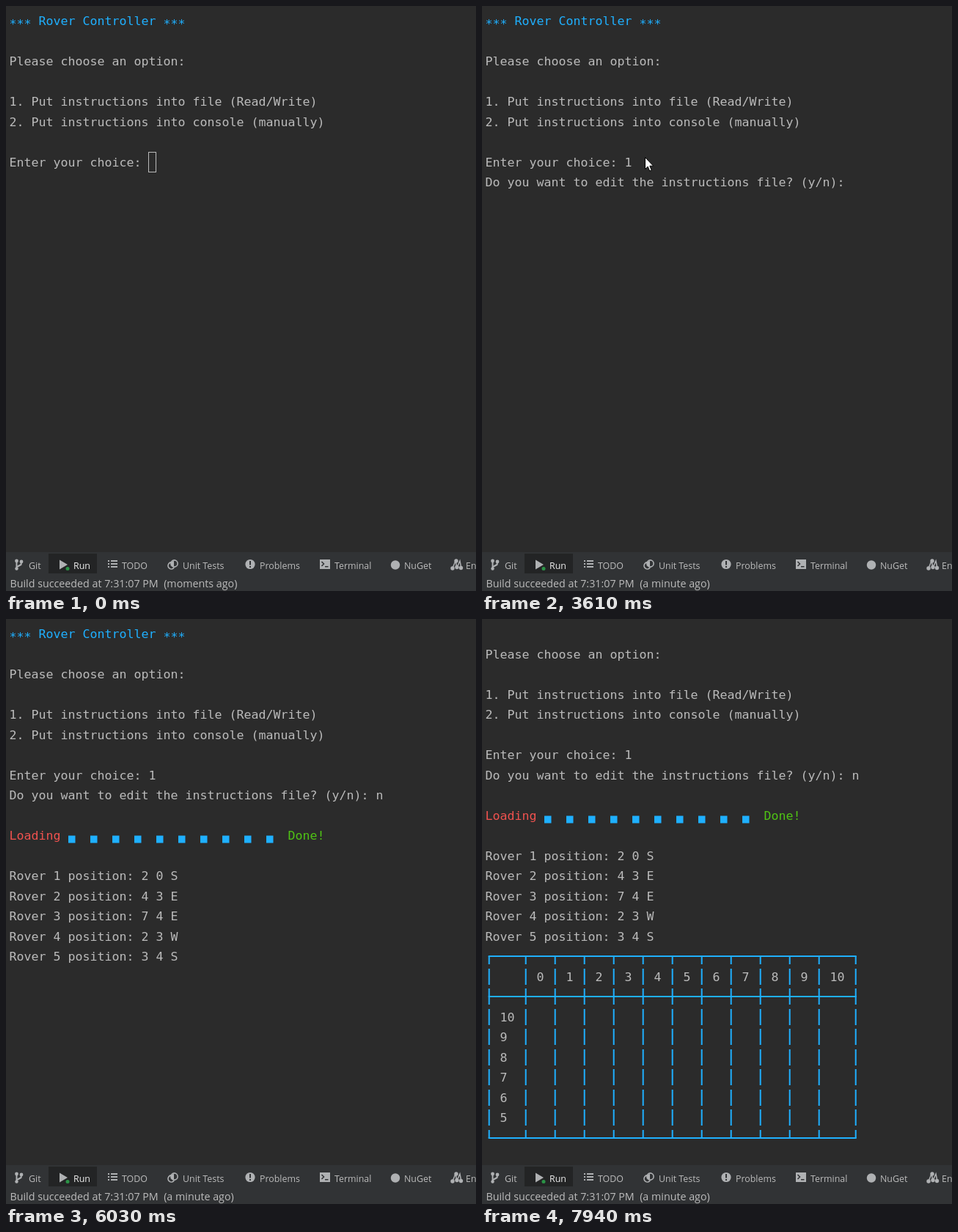
An HTML page with a canvas for the animation above (8 s loop, 641 by 798 pixels).

```html
<!DOCTYPE html>
<html lang="en">
<head>
<meta charset="utf-8">
<title>Rover Controller</title>
<style>
  html, body { margin: 0; width: 100%; height: 100%; overflow: hidden; background: #2b2b2b; }
  canvas { display: block; }
</style>
</head>
<body>
<canvas id="stage" width="641" height="798"></canvas>
<script>
const ctx = document.getElementById('stage').getContext('2d');
const LOOP = 8000;
const MONO = '16.61px "DejaVu Sans Mono", monospace';
const UI = '"Open Sans", sans-serif';
const GREY = '#bbbbbb', BLUE = '#1fb0ff', RED = '#f0524f', GREEN = '#4fc414';
const ICON = '#afb1b3', BAR = '#313335';

const LOAD_TIMES = [4490, 4610, 4750, 4890, 4940, 5090, 5200, 5310, 5420, 5530];
const ROW_TIMES = [7360, 7490, 7620, 7730, 7840, 7940];
const ROVERS = ['2 0 S', '4 3 E', '7 4 E', '2 3 W', '3 4 S'];
const MOUSE = [
  [1220, 226, 194], [1350, 224, 201], [1420, 223, 209], [2090, 223, 207],
  [5640, 224, 204], [5710, 226, 199], [5800, 229, 194], [5890, 233, 190],
  [5960, 510, 232]
];

let scroll = 0;
const passed = (times, t) => times.filter(x => t >= x).length;
const rowTop = row => 6 + Math.round(27.5 * (row - scroll));

function rect(x, y, w, h, color) {
  ctx.fillStyle = color;
  ctx.fillRect(x, y, w, h);
}

function disc(x, y, r, color) {
  ctx.fillStyle = color;
  ctx.beginPath();
  ctx.arc(x, y, r, 0, Math.PI * 2);
  ctx.fill();
}

function path(points, color, width) {
  ctx.beginPath();
  points.forEach(([x, y]) => ctx.lineTo(x, y));
  ctx.strokeStyle = color;
  ctx.lineWidth = width;
  ctx.stroke();
}

function polygon(points, color) {
  ctx.beginPath();
  points.forEach(([x, y]) => ctx.lineTo(x, y));
  ctx.closePath();
  ctx.fillStyle = color;
  ctx.fill();
}

function label(text, x, y, size, color) {
  ctx.font = size + 'px ' + UI;
  ctx.fillStyle = color;
  ctx.fillText(text, x, y);
}

function print(text, col, row, color = GREY, dy = 0) {
  if (row < scroll) return;
  ctx.font = MONO;
  ctx.fillStyle = color;
  ctx.fillText(text, 4.6 + col * 10, rowTop(row) + 20 + dy);
}

function block(col, row) {
  rect(4 + col * 10, rowTop(row), 10, 28, GREY);
}

// Box-drawing row: a horizontal rule, and stems above and/or below it
function rule(row, seps, up, down) {
  const y = rowTop(row), left = x => 8.7 + x * 10;
  rect(left(0), y + 13, seps[seps.length - 1] * 10 + 2, 2, BLUE);
  for (const s of seps) {
    if (up) rect(left(s), y + 3, 2, 11, BLUE);
    if (down) rect(left(s), y + 14, 2, 11, BLUE);
  }
}

function bars(row, seps) {
  for (const s of seps) rect(8.7 + s * 10, rowTop(row) + 3, 2, 22, BLUE);
}

function table(t) {
  if (t < 6160) return;
  const cols = t < 6760
    ? Math.min(5, 1 + Math.floor((t - 6160) / 115))
    : Math.min(11, 6 + Math.floor((t - 6760) / 100));
  const rows = passed(ROW_TIMES, t);
  const seps = [0, rows ? 5 : 3];
  for (let i = 0; i < cols; i++) {
    const start = seps[i + 1];
    seps.push(start + (i === 10 ? 5 : 4));
    print(String(i), start + 2, 18);
  }
  rule(17, seps, false, true);
  bars(18, seps);
  if (rows) rule(19, seps, true, true);
  for (let i = 0; i < rows; i++) {
    bars(20 + i, seps);
    print(String(10 - i), 2, 20 + i);
  }
  rule(rows ? 20 + rows : 19, seps, true, false);
}

function consoleText(t) {
  print('***', 0, 0, BLUE, 4);
  print('Rover Controller', 4, 0, BLUE);
  print('***', 21, 0, BLUE, 4);
  print('Please choose an option:', 0, 2);
  print('1. Put instructions into file (Read/Write)', 0, 4);
  print('2. Put instructions into console (manually)', 0, 5);
  print('Enter your choice:' + (t >= 2010 ? ' 1' : ''), 0, 7);
  if (t >= 2620)
    print('Do you want to edit the instructions file? (y/n):' + (t >= 3810 ? ' n' : ''), 0, 8);
  if (t >= 4420) print('Loading', 0, 10, RED);
  const loaded = passed(LOAD_TIMES, t);
  for (let i = 0; i < loaded; i++) rect(85 + i * 30, rowTop(10) + 14.5, 9.5, 10, BLUE);
  if (t >= 5640) print('Done!', 38, 10, GREEN);
  if (t >= 5960) ROVERS.forEach((p, i) => print(`Rover ${i + 1} position: ${p}`, 0, 12 + i));
  table(t);
}

function caret(t) {
  if (t < 1550) {
    ctx.strokeStyle = GREY;
    ctx.lineWidth = 1;
    ctx.strokeRect(194.5, 199.5, 10, 27);
  } else if (t < 2010) block(19, 7);
  else if (t < 2620) block(20, 7);
  else if (t < 3610) block(50, 8);
  else if (t < 3810) return;
  else if (t < 4360) block(51, 8);
  else if (t < 4420) block(0, 10);
  else if (t < 5640) block(7 + 3 * passed(LOAD_TIMES, t), 10);
  else if (t < 5960) block(0, 12);
}

function icons() {
  // branch
  path([[14.5, 757], [14.5, 768]], ICON, 2);
  path([[21, 758], [20.5, 762], [15, 765]], ICON, 2);
  disc(14.5, 757, 2.4, ICON);
  disc(21, 758, 2.4, ICON);
  disc(14.5, 767.5, 2.2, ICON);
  // run
  polygon([[73, 755.5], [84, 762], [73, 768.5]], ICON);
  disc(84, 767.5, 2.5, '#2b9346');
  // list
  for (let i = 0; i < 3; i++) {
    rect(139, 756 + i * 4, 2, 2, ICON);
    rect(143, 756 + i * 4, 9, 2, ICON);
  }
  // tests
  ctx.strokeStyle = ICON;
  ctx.lineWidth = 1.6;
  ctx.beginPath();
  ctx.arc(225.5, 763.5, 4.5, 0.6, 5.2);
  ctx.stroke();
  ctx.beginPath();
  ctx.arc(229.5, 760.5, 4.6, 0, Math.PI * 2);
  ctx.stroke();
  ctx.fillStyle = ICON;
  ctx.beginPath();
  ctx.arc(229, 761, 4, Math.PI / 2, Math.PI * 1.5);
  ctx.fill();
  // problems
  disc(333, 761.5, 6.6, ICON);
  rect(332, 757, 2, 5.5, BAR);
  rect(332, 764, 2, 2, BAR);
  // terminal
  rect(428, 755, 14, 13, ICON);
  path([[430.5, 758], [433.5, 761], [430.5, 764]], BAR, 1.5);
  rect(435, 764, 4.5, 1.5, BAR);
  // packages
  disc(531, 762.5, 6.2, ICON);
  // endpoints
  path([[609, 767], [613, 757], [615, 766], [619, 757], [621, 767]], ICON, 1.5);
  for (const [x, y] of [[609, 767], [614, 757], [615, 765.5], [620.5, 766.5]]) disc(x, y, 2.7, ICON);
}

function toolbar(t) {
  rect(0, 745, 641, 53, BAR);
  rect(58, 747, 66, 27, '#232425');
  const tabs = [['Git', 31], ['TODO', 158], ['Unit Tests', 241], ['Problems', 346],
    ['Terminal', 448], ['NuGet', 543], ['Endpoints', 627]];
  for (const [text, x] of tabs) label(text, x, 768, 12.4, GREY);
  label('Run', 92, 768, 12.4, '#f0f0f0');
  icons();
  const age = t < 840 ? 'moments ago' : 'a minute ago';
  label(`Build succeeded at 7:31:07 PM\u00a0 (${age})`, 5.5, 793, 14.27, GREY);
}

function mouseAt(t) {
  if (t < 460 || t >= 6030) return null;
  if (t < 1220) {
    const p = Math.floor((t - 460) / 76) / 10;
    const ease = 1 - (1 - p) ** 2;
    return [576 - 350 * ease, 340 - 147 * ease];
  }
  return MOUSE[passed(MOUSE.map(m => m[0]), t) - 1].slice(1);
}

function pointer(t) {
  const at = mouseAt(t);
  if (!at) return;
  const shape = [[0, 0], [0, 16], [3.7, 12.6], [6.2, 18.6], [8.8, 17.5], [6.3, 11.7], [11.2, 11.7]]
    .map(([x, y]) => [at[0] - 0.5 + x, at[1] - 0.5 + y]);
  polygon(shape, '#ffffff');
  ctx.lineJoin = 'round';
  path([...shape, shape[0]], '#000000', 1);
  ctx.lineJoin = 'miter';
}

function draw(t) {
  scroll = t >= 7940 ? 1 : 0;
  rect(0, 0, 641, 798, '#2b2b2b');
  consoleText(t);
  caret(t);
  toolbar(t);
  pointer(t);
}

const start = performance.now();
function tick() {
  draw((performance.now() - start) % LOOP);
  requestAnimationFrame(tick);
}
tick();
</script>
</body>
</html>
```
